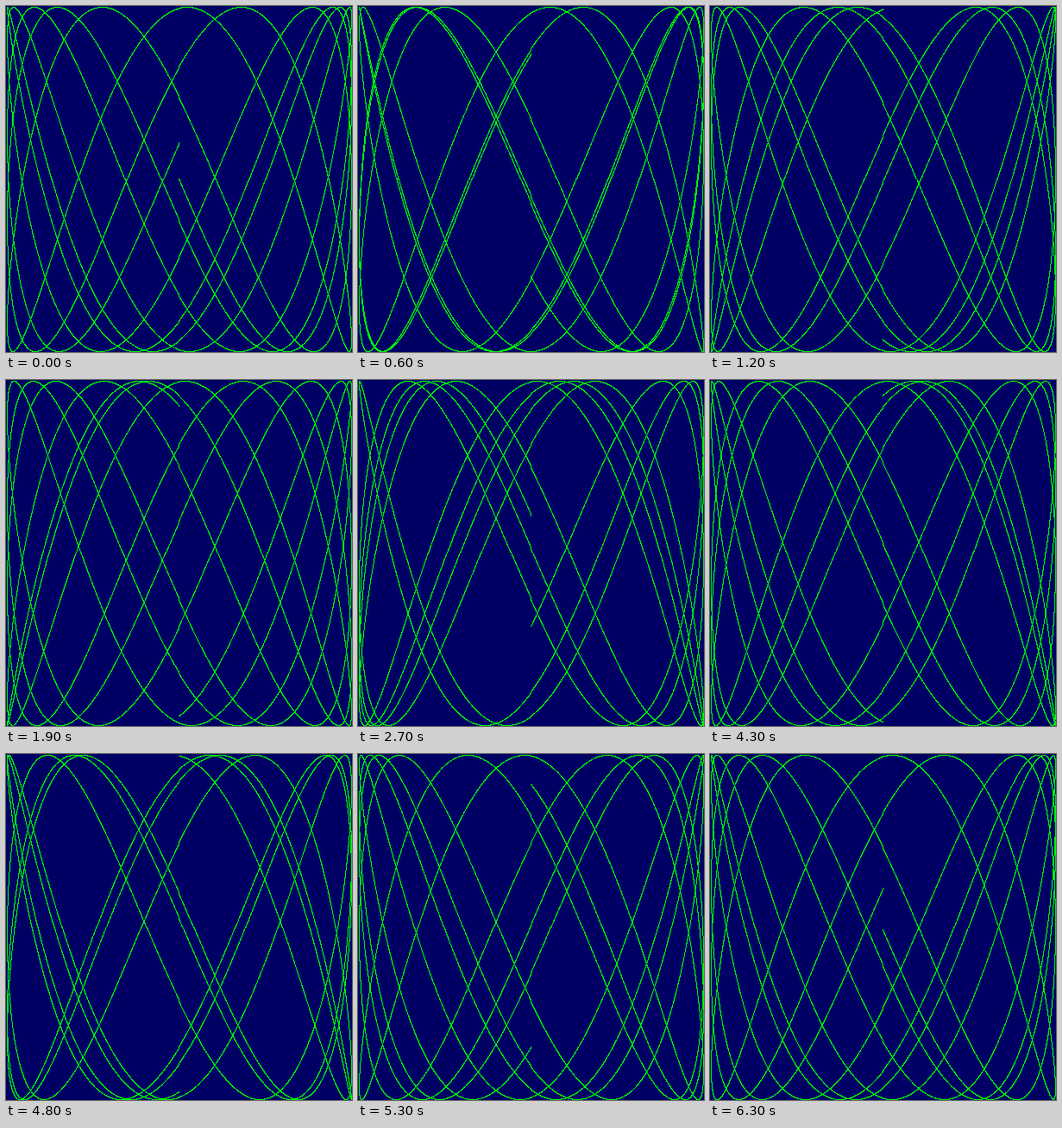
Write an HTML page with a canvas that moves like this. It is 401 px wide and 401 px high and loops after 6.4 s.

```html
<!DOCTYPE html>
<html lang="en">
<head>
<meta charset="utf-8">
<title>Lissajous</title>
<style>
  html, body { margin: 0; width: 100%; height: 100%; overflow: hidden; background: #000064; }
  canvas { display: block; width: 401px; height: 401px; image-rendering: pixelated; }
</style>
</head>
<body>
<canvas id="stage" width="401" height="401"></canvas>
<script>
const SIZE = 200;
const CYCLES = 5;
const STEP = 0.001;
const FREQ = 2.30699;
const FRAMES = 64;
const DELAY = 100;
const PHASE_STEP = 0.1;

const ctx = document.getElementById('stage').getContext('2d');
const side = 2 * SIZE + 1;
const image = ctx.createImageData(side, side);
const pixels = new Uint32Array(image.data.buffer);
const BACK = 0xff640000; // ABGR
const LINE = 0xff00ff00;

// Rounds toward zero after the half-pixel shift, so the curve spans 1..400.
const toPixel = v => SIZE + Math.trunc(v * SIZE + 0.5);

function draw(phase) {
  pixels.fill(BACK);
  for (let t = 0; t < CYCLES * 2 * Math.PI; t += STEP) {
    const x = toPixel(Math.sin(t));
    const y = toPixel(Math.sin(t * FREQ + phase));
    pixels[y * side + x] = LINE;
  }
  ctx.putImageData(image, 0, 0);
}

let start = null;
let shown = 0;

function tick() {
  const now = performance.now();
  if (start === null) start = now;
  const index = Math.floor((now - start) / DELAY) % FRAMES;
  if (index !== shown) {
    shown = index;
    draw(index * PHASE_STEP);
  }
  requestAnimationFrame(tick);
}

draw(0);
requestAnimationFrame(tick);
</script>
</body>
</html>
```
